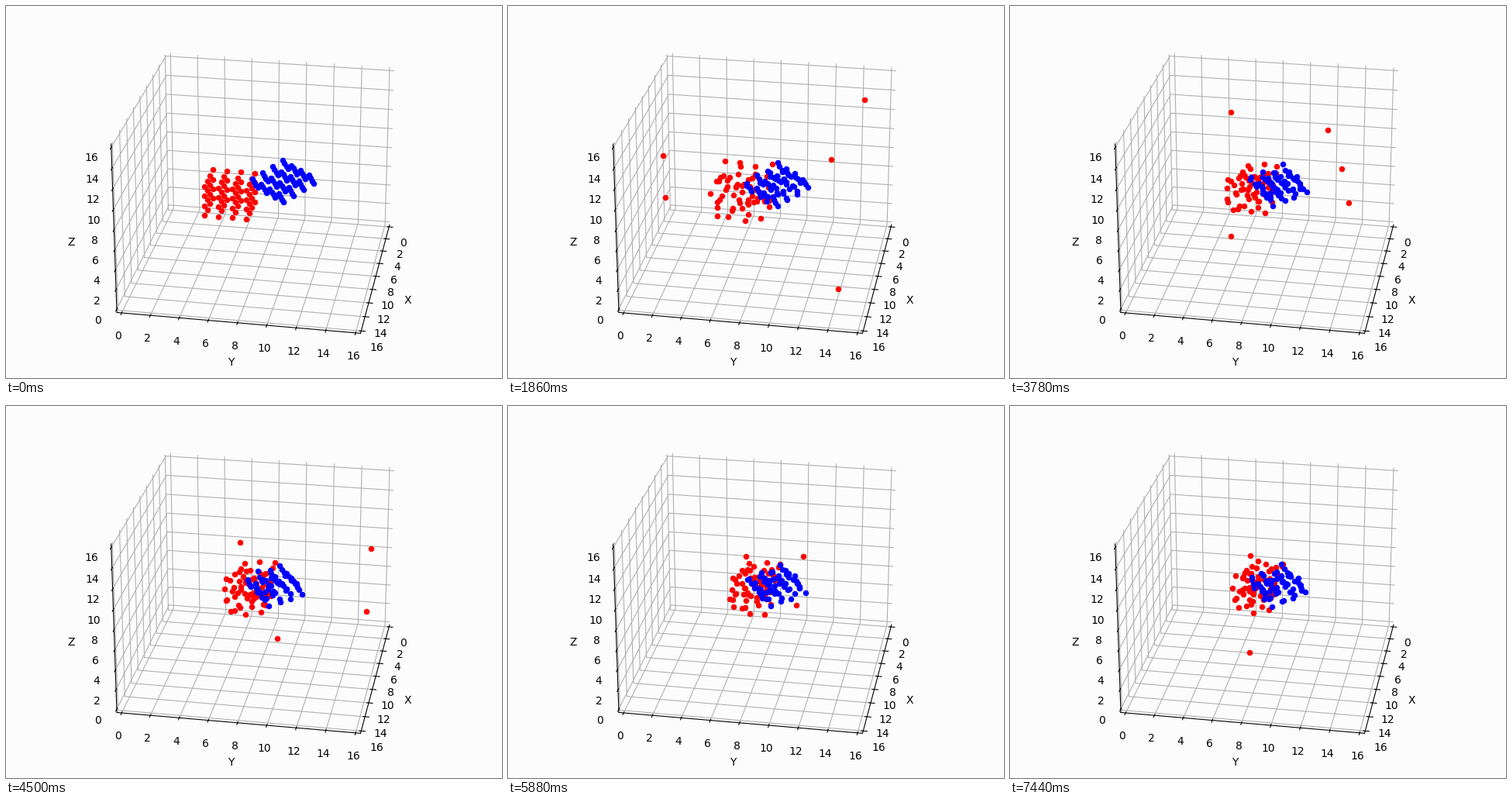
A matplotlib script for the animation above (7.5 s loop, 640 px wide and 480 px high).

```python
import numpy as np
import matplotlib.pyplot as plt
from matplotlib.animation import FuncAnimation

W, H, DPI = 640, 480, 100
FRAMES, STEP = 125, 60
BG = "#fcfcfc"
SLOTS = np.indices((4, 4, 4)).reshape(3, -1).T - 1.5

# Red particles that leave and fall back: start, end, reach and swing (x + yj)
ORBITS = [
    (900, 4000, 103 - 123j, 66 - 14j),
    (1000, 4600, 100 - 27j, 36 - 20j),
    (1000, 4600, 157 + 39j, 6 + 103j),
    (1000, 2800, -113 - 43j, 0),
    (1000, 6000, -60 + 55j, -90 - 20j),
    (1900, 5100, -33 - 100j, -8 + 5j),
    (3000, 6500, 155 - 59j, 15 + 12j),
    (2900, 6600, 145 + 31j, 26 - 3j),
    (6200, 8700, -4 + 82j, 0),
]


def ease(t, start, end):
    s = np.clip((t - start) / (end - start), 0, 1)
    return s * s * (3 - 2 * s)


def settle(t, tau):
    return 1 - np.exp(-t / tau)


def mix(a, b, s):
    return np.array(a) * (1 - s) + np.array(b) * s


class Jitter:
    """Seeded offsets that sway slowly around a fixed displacement."""

    def __init__(self, seed):
        rng = np.random.default_rng(seed)
        shape = (len(SLOTS), 2)
        self.rest = np.clip(rng.normal(0, 0.8, shape), -1.6, 1.6)
        self.rate = rng.uniform(0.6, 1.4, shape)
        self.phase = rng.uniform(0, 2 * np.pi, shape)

    def at(self, t):
        return self.rest + 0.7 * np.sin(2 * np.pi * self.rate * t / 1000 + self.phase)


red_jitter, blue_jitter = Jitter(12), Jitter(5)
runaways = np.random.default_rng(3).permutation(len(SLOTS))[:len(ORBITS)]


def red_at(t):
    """A crystal that swells, melts and drifts into the blue one."""
    melt = settle(t, 3500)
    swell = 1 + 0.28 * t / 700 * np.exp(1 - t / 700)
    center = mix((288.3, 242.9), (324, 230.5), melt)
    steps = mix([(-3.6, 7.3), (18, 1.5), (0, -12.3)],
                [(-4, 8), (12, 1), (2, -12)], melt)
    pos = center + swell * SLOTS @ steps + 4.3 * ease(t, 500, 1800) * red_jitter.at(t)
    for n, (start, end, reach, swing) in zip(runaways, ORBITS):
        if start < t < end:
            s = np.pi * (t - start) / (end - start)
            away = reach * np.sin(s) + swing * np.sin(2 * s)
            goal = np.array([313 + away.real, 236 + away.imag])
            pos[n] = mix(pos[n], goal, ease(np.sin(s), 0, 0.4))
    return pos


def blue_at(t):
    """A tilted crystal that is pushed left, then slowly turns."""
    center = mix((357.7, 226.3), (346.5, 231.5), settle(t, 800))
    steps = mix([(11.2, 6.3), (-13.1, 8), (2.2, 3.7)],
                [(7, 7.5), (-14, 4.8), (2.6, 4.2)], ease(t, 1600, 3200))
    return center + SLOTS @ steps + 3 * settle(t, 4000) * blue_jitter.at(t)


fig = plt.figure(figsize=(W / DPI, H / DPI), dpi=DPI, facecolor=BG)
ax = fig.add_axes([0, 0, 1, 1], projection="3d", facecolor=BG)
lim = (-1 / 3, 16 + 1 / 3)
ax.set(xlim=lim, ylim=lim, zlim=lim, xlabel="X", ylabel="Y", zlabel="Z")
ax.view_init(elev=25, azim=10)
for axis in (ax.xaxis, ax.yaxis, ax.zaxis):
    axis.set_pane_color((1, 1, 1, 0))
    axis.set_ticks(range(0, 17, 2))

# Particles are placed in pixels of the fixed view
layer = fig.add_axes([0, 0, 1, 1], xlim=(0, W), ylim=(H, 0), zorder=2)
layer.axis("off")
red_dots, = layer.plot([], [], "o", color="red", ms=4.4)
blue_dots, = layer.plot([], [], "o", color="blue", ms=4.4)


def update(frame):
    t = frame * STEP
    red_dots.set_data(*red_at(t).T)
    blue_dots.set_data(*blue_at(t).T)
    return red_dots, blue_dots


anim = FuncAnimation(fig, update, frames=FRAMES, interval=STEP,
                     repeat=True, repeat_delay=0)
plt.show()
```
